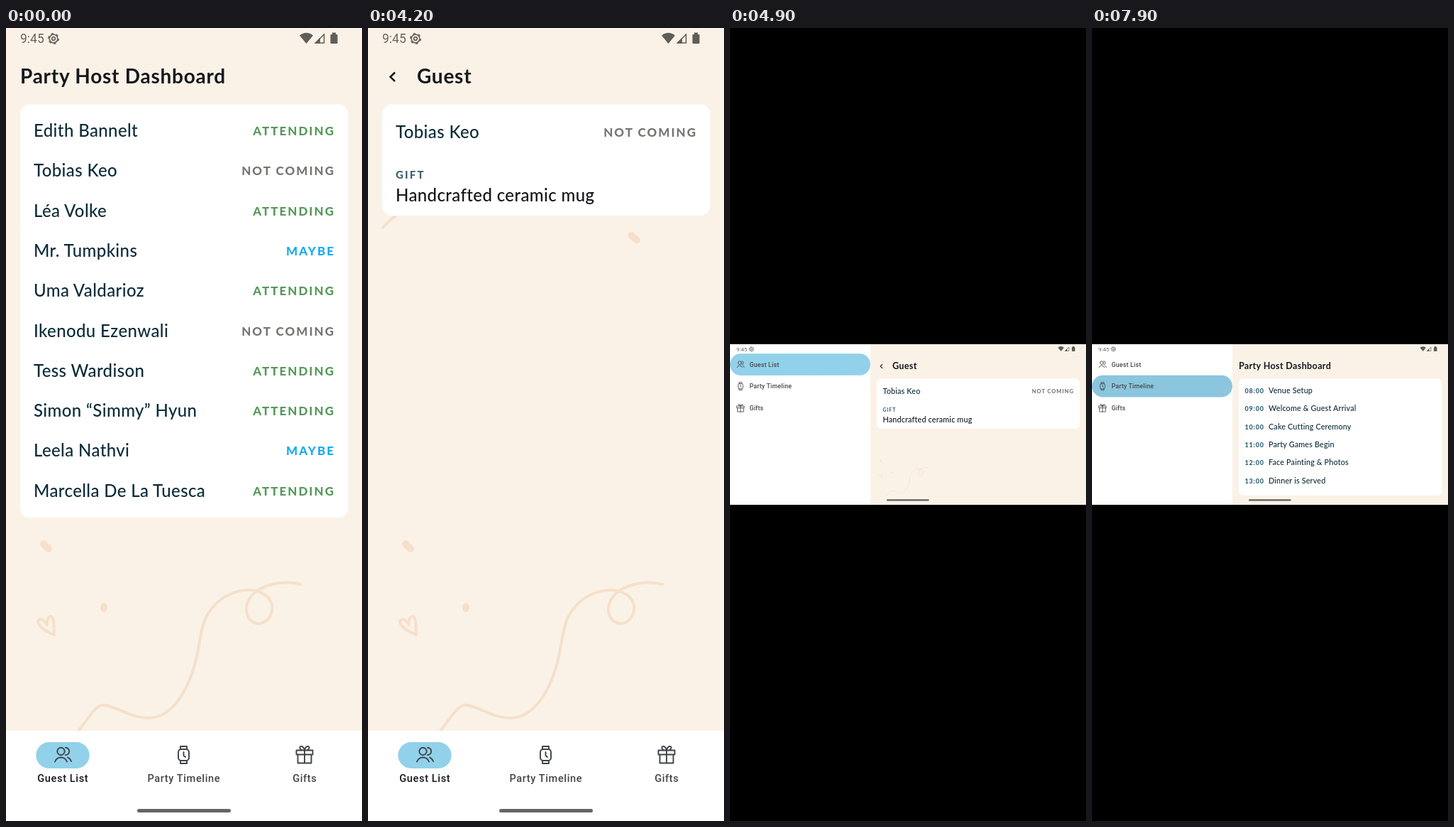
Animation, 502 px wide and 1116 px high, one loop 8 s. Source, as an HTML page:

```html
<!DOCTYPE html>
<html lang="en">
<head>
<meta charset="utf-8">
<title>Party Host Dashboard</title>
<style>
html, body { margin: 0; height: 100%; overflow: hidden; background: #fbf2e7; }
#stage { display: block; width: 100vw; height: 100vh; }
text { font-family: Lato, "Open Sans", sans-serif; }
.title { font-size: 28px; font-weight: 700; letter-spacing: .75px; fill: #16181c; }
.name { font-size: 24px; font-weight: 500; letter-spacing: .38px; fill: #0d2c3a; }
.gift { fill: #14161b; }
.tag { font-size: 17px; font-weight: 800; letter-spacing: 2px; text-anchor: end; }
.label { font-size: 15px; font-weight: 800; letter-spacing: 2.2px; fill: #3d626f; }
.hour { font-size: 20px; font-weight: 800; letter-spacing: 1.8px; fill: #2c5f73; }
.clock { font: 17.5px Roboto, sans-serif; fill: #66645f; }
.nav { font: 500 14.6px Roboto, sans-serif; letter-spacing: .6px; text-anchor: middle; fill: #454549; }
.item { font: 500 19.5px Roboto, sans-serif; letter-spacing: .5px; fill: #48484d; }
.on { fill: #17181b; }
.icon { fill: none; stroke: #3f4347; stroke-width: 1.9; stroke-linecap: round; stroke-linejoin: round; }
.doodle { fill: none; stroke: #f5e0cb; stroke-width: 4; stroke-linecap: round; stroke-linejoin: round; }
.crumb { stroke-width: 10; }
</style>
</head>
<body>
<svg id="stage" viewBox="0 0 502 1116" preserveAspectRatio="none"></svg>
<script>
const CREAM = '#fbf2e7', GREY = '#f3f3f3', BLUE = '#92d1ea';
const SCALE = 502 / 1116, BAND = 445, PANE = 440, ROW = 56.3, TAB = 68.3;
const YES = ['ATTENDING', '#57985a'], NO = ['NOT COMING', '#77756f'], MAYBE = ['MAYBE', '#14abf1'];
const guests = [
  ['Edith Bannelt', YES], ['Tobias Keo', NO], ['Léa Volke', YES], ['Mr. Tumpkins', MAYBE],
  ['Uma Valdarioz', YES], ['Ikenodu Ezenwali', NO], ['Tess Wardison', YES],
  ['Simon “Simmy” Hyun', YES], ['Leela Nathvi', MAYBE], ['Marcella De La Tuesca', YES]
];
const plan = ['Venue Setup', 'Welcome &amp; Guest Arrival', 'Cake Cutting Ceremony',
  'Party Games Begin', 'Face Painting &amp; Photos', 'Dinner is Served'];
const tabs = ['Guest List', 'Party Timeline', 'Gifts'];
const icons = [
  '<circle cx="-2.500" cy="-5" r="5.200"/><path d="M4-10.200a5.200 5.200 0 0 1 0 10.400M-11 9.500Q-8.500 3.500-2.500 3.500T6 9.500M7 3.500Q10.500 5 12 9"/>',
  '<rect x="-7.500" y="-8" width="15" height="16" rx="4"/><path d="M-4.500-8V-12H4.500V-8M-4.500 8V12H4.500V8M0-4V1L2.500 3"/>',
  '<path d="M-11.500-6.500h23v6h-23zM-9.500-.5V11.500H9.500V-.5M0-6.500V11.500M0-6.500C-8-6-8-13-4-12Q-1-11 0-6.500Q1-11 4-12C8-13 8-6 0-6.500"/>'
];

const text = (x, y, cls, str, fill = '') =>
  `<text x="${x}" y="${y}" class="${cls}"${fill && ` style="fill:${fill}"`}>${str}</text>`;
const box = (x, y, w, h, fill, r = 0, attr = '') =>
  `<rect x="${x}" y="${y}" width="${w}" height="${h}" rx="${r}" fill="${fill}" ${attr}/>`;
const group = (id, body) => `<g id="${id}">${body}</g>`;
const icon = (i, x, y) => `<g class="icon" transform="translate(${x} ${y})">${icons[i]}</g>`;
const card = (w, h) => box(20, 107.5, w - 39.5, h, '#fff', 14);
const tag = (w, y, [str, fill]) => text(w - 38, y, 'tag', str, fill);

const doodles = attr => `<g class="doodle" ${attr}>
  <path class="crumb" d="M53 726l7 7M371.500 292l7.500 6.500"/>
  <ellipse cx="138" cy="815.500" rx="5" ry="6.500" fill="#f5e0cb" stroke="none"/>
  <path d="M68 854C60 851 46 844 45 836C45 830 53 831 58 840C56 832 62 825 65 829C69 835 67 846 68 854"/>
  <path stroke-linecap="butt" d="M20 282Q28 272 40 264"/>
  <path d="M102 989C115 974 124 955 136 953C150 951 175 972 203 971C240 969 262 920 270 880
    C276 848 277 832 290 817C305 798 327 790 345 791C368 793 377 807 375 820C373 832 364 838 356 838
    C346 838 338 829 339 816C340 800 356 788 372 784C388 779 402 780 415 783"/></g>`;

const statusBar = w => text(20, 21, 'clock', '9:45') +
  `<g fill="none" stroke="#66645f" stroke-width="1.7"><circle cx="67" cy="15" r="5.800"/>
   <circle cx="67" cy="15" r="7.200" stroke-dasharray="3.600 3.940"/><circle cx="67" cy="15" r="2.300"/></g>
   <g transform="translate(${w - 502})" fill="#5f5d58">
   <path d="M414 10.500Q423.500 3 433 10.500L423.500 22z"/><path d="M435 21.500L443 13.500V21.500z"/>
   <path d="M436.500 21L448.500 9V21z" fill="none" stroke="#5f5d58" stroke-width="1.500"/>
   <path d="M460 9V6.500h5V9h1.500q1 0 1 1v11q0 1-1 1h-8q-1 0-1-1V10q0-1 1-1z"/></g>`;

const rows = (w, count) => guests.slice(0, count).map(([name, state], i) =>
  text(39, 153 + ROW * i, 'name', name) + tag(w, 151 + ROW * i, state)).join('');

const planRows = plan.map((what, i) => {
  const hour = String(8 + i).padStart(2, '0') + ':00';
  return text(39, 153 + ROW * i, 'hour', `${hour}<tspan class="name" dx="14">${what}</tspan>`);
}).join('');

const heading = text(20, 78, 'title', 'Party Host Dashboard');
const guestPage = w =>
  '<path d="M38 62.500L31.500 68.800L38 75" fill="none" stroke="#16181c" stroke-width="2.500"/>' +
  text(69, 78, 'title', 'Guest') + card(w, 156.5) + text(39, 155, 'name', guests[1][0]) +
  tag(w, 153, guests[1][1]) + text(39, 211.5, 'label', 'GIFT') +
  text(39, 243.5, 'name gift', 'Handcrafted ceramic mug');

const portrait = box(0, 0, 502, 1116, CREAM) + doodles('') +
  group('guest', guestPage(502)) +
  group('list', heading + card(502, 581.5) +
    '<svg x="20" y="173.500" width="463" height="56"><circle id="ripple" cx="231" cy="28" fill-opacity=".1"/></svg>' +
    rows(502, 10)) +
  statusBar(502) + box(0, 989, 502, 127, '#fff') + box(42.3, 1005, 75.4, 37, BLUE, 18.5) +
  tabs.map((name, i) => icon(i, 80 + 170.5 * i, 1023) +
    text(80.3 + 170.5 * i, 1061, i ? 'nav' : 'nav on', name)).join('') +
  box(185, 1099, 132, 5, '#64646a', 2.5);

const W = 1116 - PANE;
const landscape = box(0, 0, PANE, 502, '#fff') + box(PANE, 0, W, 502, CREAM) +
  `<g transform="translate(${PANE})">` + doodles('transform="translate(9 58) scale(.42)"') +
  group('list2', heading + card(W, 365) + group('names', rows(W, 6)) + group('plan', planRows)) +
  group('guest2', guestPage(W)) + '</g>' +
  box(0, 29, PANE, TAB, BLUE, 34, 'id="pill0"') + box(0, 29 + TAB, PANE, TAB, BLUE, 34, 'id="pill1"') +
  box(0, 29 + TAB, PANE, TAB, '#000', 34, 'id="press"') +
  tabs.map((name, i) => icon(i, 33, 63 + TAB * i) + text(61, 70 + TAB * i, 'item', name)).join('') +
  statusBar(1116) + box(491, 485, 133, 5, '#5f5f5c', 2.5);

const $ = id => document.getElementById(id);
$('stage').innerHTML = box(0, 0, 502, 1116, GREY) + group('portrait', portrait) + group('landscape', landscape) +
  `<path id="bars" d="M0 0H502V${BAND}H0zM0 671H502V1116H0z"/>`;

const ramp = (t, from, to) => Math.min(1, Math.max(0, (t - from) / (to - from)));
const fade = (id, a) => {
  $(id).style.opacity = a;
  $(id).style.display = a ? '' : 'none';
};
// cubic-bezier(.4, 0, .2, 1)
function ease(x) {
  if (x <= 0 || x >= 1) return x;
  let lo = 0, hi = 1;
  for (let i = 0; i < 20; i++) {
    const s = (lo + hi) / 2, r = 1 - s;
    if (1.2 * r * r * s + .6 * r * s * s + s ** 3 < x) lo = s; else hi = s;
  }
  return lo * lo * (3 - 2 * lo);
}
const swap = (from, to, p) => { fade(from, 1 - p); fade(to, p); };
// The next page comes up beneath the fading one.
function turnPage(from, to, p) {
  fade(from, 1 - ease(p));
  fade(to, ease(p) ** .75);
}

function draw(t) {
  turnPage('list', 'guest', ramp(t, 1425, 2125));
  $('ripple').setAttribute('r', t < 1300 ? 0 : 60 + 180 * ramp(t, 1300, 1530));

  const turned = t >= 4500;
  const angle = t > 5100 ? 0 : -38 * Math.exp((4500 - t) / 45);
  const about = `translate(251 558) rotate(${angle}) scale(${SCALE})`;
  $('portrait').setAttribute('transform', turned ? about + 'translate(-251 -558)'
    : t >= 4400 ? 'matrix(0 -1 1 0 0 502)' : '');
  $('landscape').setAttribute('transform', about + 'translate(-558 -251)');
  fade('portrait', turned ? .85 * (1 - ramp(t, 4500, 4610)) : 1);
  fade('landscape', turned ? ramp(t, 4510, 4730) : 0);
  fade('bars', turned ? 1 : 0);

  turnPage('guest2', 'list2', ramp(t, 6260, 6960));
  swap('pill0', 'pill1', ramp(t, 7450, 7550));
  swap('names', 'plan', ramp(t, 7450, 7780));
  fade('press', .05 * ramp(t, 7380, 7480));
}

function tick() {
  draw(performance.now() % 8000);
  requestAnimationFrame(tick);
}
tick();
</script>
</body>
</html>
```
